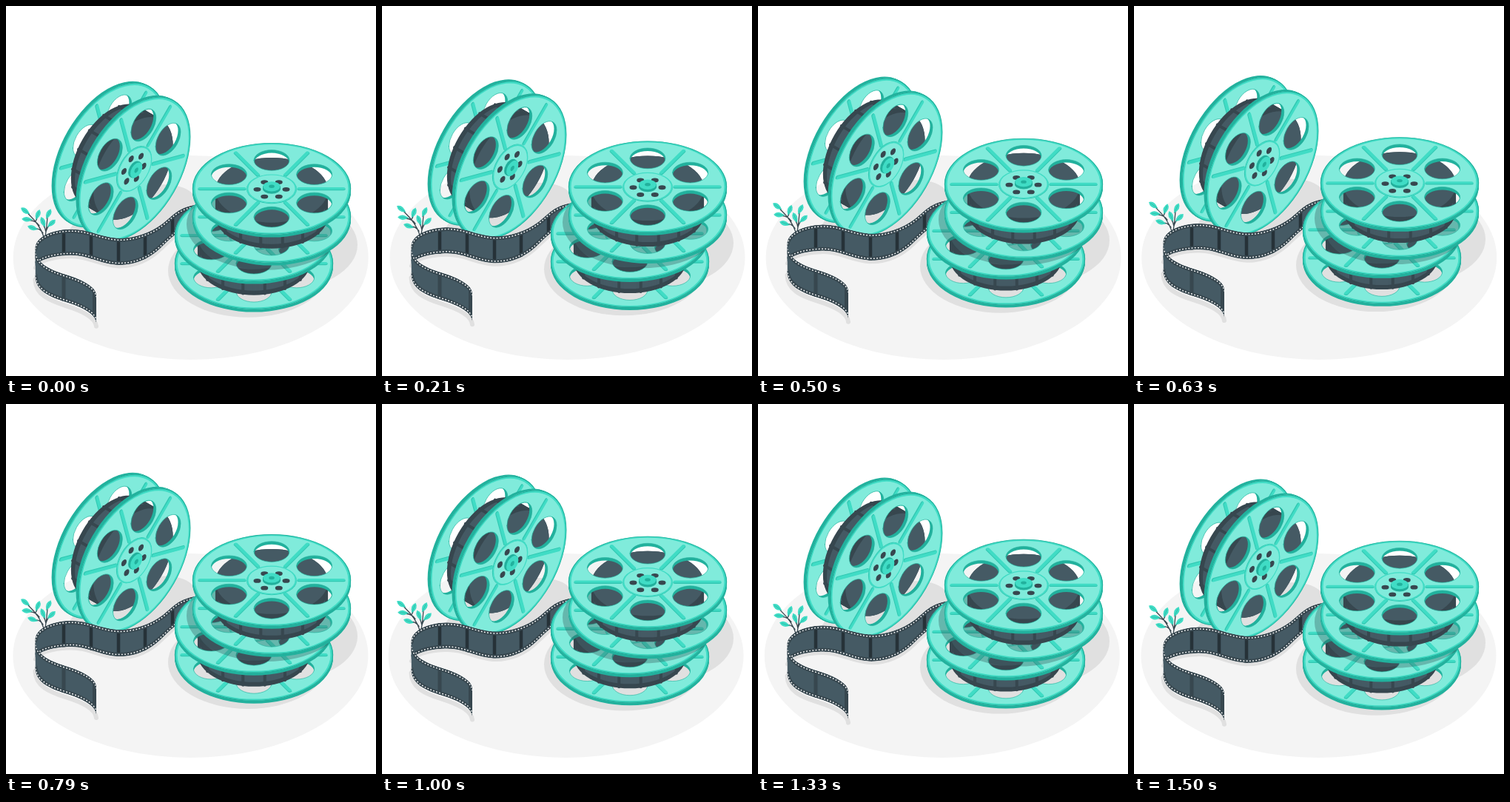
An HTML page for the animation above (1.54 s loop, 500 px wide and 500 px high).

```html
<!DOCTYPE html>
<html lang="en">
<head>
<meta charset="utf-8">
<title>Film reels</title>
<style>
  html, body { margin: 0; width: 100%; height: 100%; overflow: hidden; background: #fff; }
  svg { display: block; width: 100%; height: 100%; }
</style>
</head>
<body>
<svg id="stage" viewBox="0 0 500 500"></svg>
<script>
const FACE = '#80ebdb', MID = '#40dcc5', SOFT = '#30c8b2', DARK = '#22b19d';
const FILM = '#455a64', EDGE = '#37474f', INK = '#263238', SHADE = '#e0e0e0';
const LOOP = 1540, STEPS = 37, LIFT = 9.5;

const TAU = Math.PI * 2;
const range = n => [...Array(n).keys()];
const polar = (r, a) => [r * Math.cos(a), r * Math.sin(a)];
const ring = (r, x = 0, y = 0) =>
  `M${x - r} ${y}a${r} ${r} 0 1 0 ${2 * r} 0a${r} ${r} 0 1 0 ${-2 * r} 0z`;
const path = (d, attrs) => `<path d="${d}" ${attrs}/>`;
const stroke = (color, width) =>
  `fill="none" stroke="${color}" stroke-width="${width}" stroke-linecap="round"`;

// Planes: 2x2 matrix, turn of the spokes, and screen direction away from the viewer.
const flat = { m: [1, 0, 0, .577], turn: 0, axis: [0, 1] };
const upright = { m: [.707, -.408, 0, .8165], turn: TAU / 24, axis: [-.866, -.5] };

const place = (p, x, y, depth, body) =>
  `<g transform="matrix(${p.m} ${x + p.axis[0] * depth} ${y + p.axis[1] * depth})">${body}</g>`;

function disk(p, x, y) {
  const at = (depth, body) => place(p, x, y, depth, body);
  const sixth = i => p.turn + i * TAU / 6;
  const holes = range(6).map(i => ring(24, ...polar(66.5, sixth(i + .5)))).join('');
  const body = ring(107) + holes;
  const spokes = range(6).map(i => {
    const a = sixth(i);
    return `M${polar(37, a)}L${polar(97, a)}`;
  }).join('');
  const bolts = range(6).map(i => ring(5, ...polar(19.5, sixth(i)))).join('');
  const solid = (d, color) => path(d, `fill="${color}" fill-rule="evenodd"`);

  return [4, 3, 2, 1].map(d => at(d, solid(body, DARK))).join('') +
    at(0, solid(body, FACE) +
      path(ring(104.9), stroke(MID, 3)) +
      path(ring(106.5), stroke(DARK, 1.4)) +
      path(holes, stroke(DARK, .8))) +
    at(.8, path(spokes, stroke(SOFT, 5.6))) +
    at(-.4, path(spokes, stroke(MID, 5.2))) +
    at(.8, solid(ring(34), SOFT)) +
    at(0, solid(ring(33.5), FACE) + path(ring(32.6), stroke(MID, 2))) +
    at(1, solid(bolts, EDGE)) +
    [0, -1, -2].map(d => at(d, solid(ring(12), DARK))).join('') +
    at(-3, solid(ring(11.5), MID) + solid(ring(3.8), DARK));
}

function roll(p, x, y) {
  const [a, b, c, d] = p.m;
  const layers = range(36).map(i => {
    const depth = 37 - i;
    const color = i > 5 && i < 24 ? FILM : EDGE;
    return place(p, x, y, depth, path(ring(76), `fill="${color}"`));
  }).join('');
  const seams = range(16).map(i => {
    const [u, v] = polar(75.5, (i + .5) * TAU / 16);
    const px = x + a * u + c * v, py = y + b * u + d * v;
    const end = k => [px + p.axis[0] * k, py + p.axis[1] * k];
    return `M${end(36)}L${end(6)}`;
  }).join('');
  return layers + path(seams, stroke(EDGE, 4)) +
    place(p, x, y, 2, path(ring(76), `fill="${FILM}"`));
}

function reel(p, x, y) {
  const [dx, dy] = p.axis;
  return disk(p, x + dx * 38, y + dy * 38) + roll(p, x, y) + disk(p, x, y);
}

// Ribbon edges are chains of cubic points.
const curve = pts => `M${pts[0]}C${pts.slice(1).join(' ')}`;
const shift = (pts, dx, dy) => pts.map(([x, y]) => [x + dx, y + dy]);

function ribbon(id, top, bottom, seams) {
  const back = [...bottom].reverse();
  const outline = `${curve(top)}L${back[0]}C${back.slice(1).join(' ')}z`;
  const border = (pts, dy) => {
    const d = curve(shift(pts, 0, dy));
    return path(d, `fill="none" stroke="${EDGE}" stroke-width="5"`) +
      path(d, `fill="none" stroke="#fff" stroke-width="1.5" stroke-dasharray="1.7 2.5"`);
  };
  const lines = seams.map(([x, y, h, color, w]) =>
    path(`M${x} ${y}v${h}`, `stroke="${color}" stroke-width="${w}"`)).join('');
  return `<clipPath id="${id}">${path(outline, '')}</clipPath><g clip-path="url(#${id})">` +
    path(outline, `fill="${FILM}"`) + lines + border(top, 2.4) + border(bottom, -2.4) + '</g>';
}

const upTop = [[262, 268], [231, 272], [226, 284], [211, 295], [195, 307], [172, 315], [150, 314],
  [125, 312], [110, 301], [85, 302], [60, 303], [40, 313], [39.5, 328]];
const upBottom = [[262, 292], [238, 298], [226, 311], [211, 325], [196, 340], [176, 351], [150, 350],
  [125, 348], [110, 336], [85, 337], [60, 338], [43, 344], [39.5, 352]];
const lowTop = [[39.5, 328], [40, 348], [58, 356], [80, 363], [106, 371], [121, 380], [122, 391]];
const lowBottom = shift(lowTop, 0, 37);

const strip = ribbon('far', upTop, upBottom, [
  [78, 303, 35, INK, 4.5], [115, 306, 37, INK, 4.5], [152, 314, 36, INK, 4.5],
  [188, 308, 35, INK, 4.5], [225, 285, 28, INK, 4.5]
]) + ribbon('near', lowTop, lowBottom, [[78, 363, 36, EDGE, 5], [119.5, 382, 46, EDGE, 5]]);

const stripShadow = path(curve(shift(upBottom, 0, 2)), stroke(SHADE, 5)) +
  path(curve(shift(lowBottom, 0, 5)), stroke(SHADE, 6));

const ellipse = (x, y, rx, ry, attrs) =>
  `<ellipse cx="${x}" cy="${y}" rx="${rx}" ry="${ry}" ${attrs}/>`;

const leaf = ([x, y, deg]) =>
  `<g transform="translate(${x} ${y}) rotate(${deg})">` +
  path('M-7.3 0Q-2 -6.5 7.3 0Q-1 6.5 -7.3 0z', `fill="${MID}"`) +
  path('M-4 0H7', stroke(DARK, .6)) + '</g>';

const plant = path('M51 312Q46 296 30 281M45 297Q40 290 33 290M50 307Q46 301 41 301' +
  'M40 291Q42 288 42 286M53 312Q55 299 56 286M54 305Q56 299 58 297M54 306Q53 300 51 297',
  stroke(EDGE, 1.3)) +
  [[26, 277, 35], [28.5, 288.5, 4], [36, 300, 18], [43, 282, 110],
   [57.5, 281, 115], [61.5, 294, 137], [50, 292, 68]].map(leaf).join('');

const stage = document.getElementById('stage');
stage.innerHTML = `
  <clipPath id="lower">${ellipse(335, 312, 107, 63, '')}</clipPath>
  ${ellipse(250, 340, 240, 138, 'id="floor" fill="#f4f4f4"')}
  <g id="scene">
    ${ellipse(170, 292, 92, 42, `fill="${SHADE}" transform="rotate(-20 170 292)"`)}
    ${ellipse(368, 323, 107, 62, `fill="${SHADE}"`)}
    ${ellipse(327, 358, 108, 63, `fill="${SHADE}"`)}
    ${stripShadow}
    ${plant}
    ${reel(upright, 173.6, 220.6)}
    ${strip}
    ${reel(flat, 335, 310)}
    <g clip-path="url(#lower)">${ellipse(352, 295, 108, 62, 'fill="#2c4a4c" opacity=".32"')}</g>
    ${reel(flat, 359, 247)}
  </g>`;

const floor = document.getElementById('floor');
const scene = document.getElementById('scene');
const start = performance.now();

function draw(now) {
  const t = Math.max(0, now - start) % LOOP;
  const step = Math.floor((t + 3) / LOOP * STEPS) % STEPS;
  const p = (step + .36) / STEPS;
  const rise = 1 - Math.abs(2 * p - 1);
  scene.setAttribute('transform', `translate(0 ${-LIFT * rise})`);
  floor.setAttribute('cx', 249.6 + 1.2 * Math.sin(p * TAU));
  requestAnimationFrame(draw);
}
draw(start);
</script>
</body>
</html>
```
